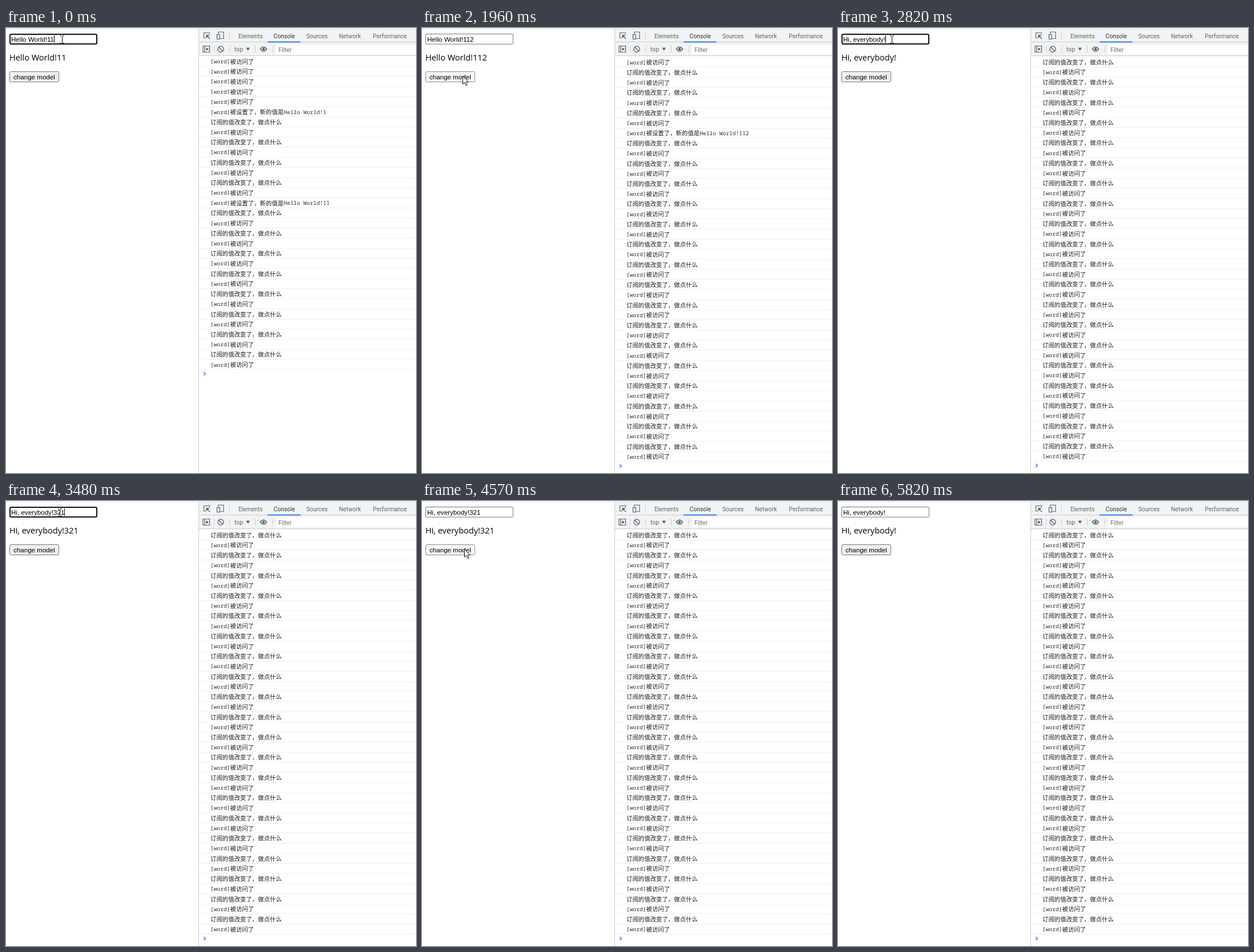
Write an HTML page with a canvas that moves like this. It is 718 by 780 pixels and loops after 6.19 s.

```html
<!DOCTYPE html>
<html lang="zh-CN">
<head>
<meta charset="utf-8">
<title>Two-way binding</title>
<style>
html, body { margin: 0; width: 100%; height: 100%; overflow: hidden; background: #fff; }
canvas { display: block; }
</style>
</head>
<body>
<canvas id="stage" width="718" height="780"></canvas>
<script>
const ctx = document.getElementById('stage').getContext('2d');
const LOOP = 6190;
const ROW = 17.72;
const ARIAL = '11.6px "Liberation Sans", Arial, sans-serif';
const BODY = '14.5px "Open Sans", "Noto Sans", sans-serif';
const UI = '10.3px Roboto, sans-serif';
const MONO = '9.6px "Noto Sans Mono", monospace';
const CJK = '500 10.42px "Noto Sans CJK SC", "Noto Sans CJK", sans-serif';
const VISIT = '[word]被访问了', NOTIFY = '订阅的值改变了，做点什么';
const HELLO = 'Hello World!', HI = 'Hi, everybody!';

// Model values over time: start, text, caret x
const edits = [
  [0, HELLO + '11', 84], [120, HELLO + '112', 90], [2120, HI, 83],
  [3100, HI + '3', 89], [3290, HI + '32', 96], [3480, HI + '321', 102], [4760, HI, 83]
];

// Console contents over time: start, number of values set, rows shown after the last one
const logs = [
  [0, 2], [180, 3], [2150, 4], [3140, 5, 9], [3190, 5], [3330, 6],
  [3520, 7, 9], [3570, 7], [4790, 8, 8], [4840, 8]
];

// Pointer path: time, x, y
const path = [
  [0, 98, 20], [460, 98, 20], [770, 100, 56], [1090, 100, 56], [1440, 71, 84],
  [2400, 71, 84], [2780, 94, 20], [3560, 94, 20], [3870, 109, 65], [4090, 101, 77],
  [4110, 100, 78], [4450, 74, 84], [4890, 74, 84], [5350, 536, 600], [5820, 674, 784]
];

const focusTimes = [[0, 1960], [2820, 4570]];
const pressTimes = [[1960, 2120], [4570, 4760]];
const within = (spans, t) => spans.some(([a, b]) => t >= a && t < b);
const latest = (list, t) => list.filter(e => e[0] <= t).pop();

function pointerAt(t) {
  const i = path.findIndex(p => p[0] > t);
  if (i < 0) return path[path.length - 1].slice(1);
  const [t0, x0, y0] = path[i - 1], [t1, x1, y1] = path[i];
  const k = (t - t0) / (t1 - t0), e = k * k * (3 - 2 * k);
  return [Math.round(x0 + (x1 - x0) * e), Math.round(y0 + (y1 - y0) * e)];
}

// Every new value doubles the number of subscribers that react
function buildLog(count, cut) {
  const values = [HELLO + '1', ...edits.map(e => e[1])];
  const rows = Array(5).fill(VISIT);
  for (let i = 0; i < count; i++) {
    rows.push('[word]被设置了，新的值是' + values[i]);
    const size = i === count - 1 && cut ? cut : 8 << i;
    for (let j = 0; j < size; j++) rows.push(j % 2 ? VISIT : NOTIFY);
  }
  return rows;
}

function text(str, x, y, font, color) {
  ctx.font = font;
  ctx.fillStyle = color;
  ctx.fillText(str, x, y);
}

function rect(x, y, w, h, color) {
  ctx.fillStyle = color;
  ctx.fillRect(x, y, w, h);
}

function stroke(d, color, width = 1.2) {
  ctx.strokeStyle = color;
  ctx.lineWidth = width;
  ctx.stroke(new Path2D(d));
}

function box(x, y, w, h, r, fill, line, width) {
  ctx.beginPath();
  ctx.roundRect(x, y, w, h, r);
  ctx.fillStyle = fill;
  ctx.fill();
  ctx.strokeStyle = line;
  ctx.lineWidth = width;
  ctx.stroke();
}

function mixedText(str, x, y) {
  for (const part of str.match(/[\x20-\x7e]+|[^\x20-\x7e]+/g)) {
    const latin = part.charCodeAt(0) < 128;
    text(part, x, y + (latin ? 3.4 : 4), latin ? MONO : CJK, latin ? '#303030' : '#1c1c1c');
    x += ctx.measureText(part).width;
  }
}

function drawConsole(t) {
  const [, count, cut] = latest(logs, t);
  const rows = buildLog(count, cut);
  const bottom = rows.length > 64 ? 750.7 : 751.4;
  const last = Math.min(58.6 + ROW * (rows.length - 1), bottom);
  ctx.save();
  ctx.beginPath();
  ctx.rect(338, 49, 380, 731);
  ctx.clip();
  for (let i = rows.length - 1, y = last; i >= 0 && y > 40; i--, y -= ROW) {
    rect(338, Math.round(y + 8), 380, 1, '#f0f0f0');
    mixedText(rows[i], 358, y);
  }
  const p = Math.round(last + 16.2);
  stroke(`M346 ${p - 3}L349.3 ${p}L346 ${p + 3}`, '#367cf1', 1.5);
  ctx.restore();
}

function drawToolbar() {
  const grey = '#5f6368', line = '#cacdd1';
  rect(338, 2, 380, 46, '#f1f3f4');
  rect(338, 24, 380, 1, line);
  rect(338, 48, 380, 1, line);
  rect(337, 2, 1, 778, line);
  rect(0, 1, 718, 1, '#e0e0e0');
  rect(458, 23.6, 58, 1.8, '#1a73e8');

  const tabs = [['Elements', 407], ['Console', 468.5], ['Sources', 526], ['Network', 583], ['Performance', 642.5]];
  for (const [name, x] of tabs) text(name, x, 17.5, UI, name === 'Console' ? '#333' : grey);
  rect(391, 7, 1, 13, line);
  for (const x of [364, 391, 436, 467]) rect(x, 31, 1, 12, line);

  // Inspect and device icons
  stroke('M350 17.5H346.5V8.5H356.5V11', grey);
  stroke('M357 19L352.5 14.5', grey, 1.4);
  ctx.fillStyle = grey;
  ctx.fill(new Path2D('M350.5 12H356.5L350.5 18Z'));
  stroke('M372 11V7H381V18.5H375.5M369.5 11.5H374.5V19.5H369.5Z', grey);

  // Sidebar, clear and eye icons
  stroke('M345 31.5H356.5V42.5H345ZM348 31.5V42.5', grey);
  ctx.fill(new Path2D('M350.5 34L355 37L350.5 40Z'));
  stroke('M381 37A5 5 0 1 1 371 37A5 5 0 1 1 381 37M372.5 33.5L379.5 40.5', grey, 1.3);
  text('top', 400, 40.6, UI, grey);
  ctx.fill(new Path2D('M420.5 34.5H427L423.75 40Z'));
  stroke('M445.3 37Q451 29.5 456.7 37Q451 44.5 445.3 37Z', grey, 1.4);
  ctx.beginPath();
  ctx.arc(451, 37, 2.3, 0, 7);
  ctx.fill();

  rect(473, 29, 245, 17, '#fff');
  text('Filter', 477.3, 41.8, UI, '#6b6b6b');
}

function caretOn(t) {
  const resets = [0, 120, 2820, 3100, 3290, 3480];
  const start = resets.filter(r => r <= t).pop();
  return Math.floor((t - start) / 492) % 2 === 0;
}

function drawPage(t, [px, py]) {
  const [, value, caret] = latest(edits, t);
  const focused = within(focusTimes, t);
  if (focused) box(7, 11, 152, 17, 2, '#fff', '#101010', 2);
  else box(6.5, 10.5, 153, 17.7, 1.5, '#fff', '#767676', 1);
  text(value, 9, 23.8, ARIAL, '#000');
  if (focused && caretOn(t)) rect(caret, 13, 1, 13, '#000');

  text(value, 6, 57, BODY, '#000');

  const hover = px >= 6 && px < 93 && py >= 76 && py < 95;
  const [fill, border] = within(pressTimes, t) ? ['#f5f5f5', '#8d8d8d']
    : hover ? ['#e5e5e5', '#4f4f4f'] : ['#efefef', '#767676'];
  box(6.5, 76.5, 86, 18, 2, fill, border, 1);
  text('change model', 13, 89.8, ARIAL, '#000');
}

function drawPointer([x, y]) {
  ctx.save();
  ctx.translate(x, y);
  const overText = x < 116 && (y > 10 && y < 29 || y > 43 && y < 62);
  if (overText) {
    stroke('M-3 -6.5H-1M1 -6.5H4M0.5 -6V6M-3 6.5H-1M1 6.5H4', '#000', 1);
  } else {
    const arrow = 'M.5 .5V14.3L3.6 11.4L5.9 16.6L8.2 15.6L6 10.6H10.3Z';
    ctx.fillStyle = '#fff';
    ctx.fill(new Path2D(arrow));
    stroke(arrow, '#111', 1);
  }
  ctx.restore();
}

function frame(now) {
  const t = now % LOOP;
  const pointer = pointerAt(t);
  rect(0, 0, 718, 780, '#fff');
  drawPage(t, pointer);
  drawConsole(t);
  drawToolbar();
  drawPointer(pointer);
}

const began = performance.now();
function tick() {
  frame(performance.now() - began);
  requestAnimationFrame(tick);
}
tick();
</script>
</body>
</html>
```
